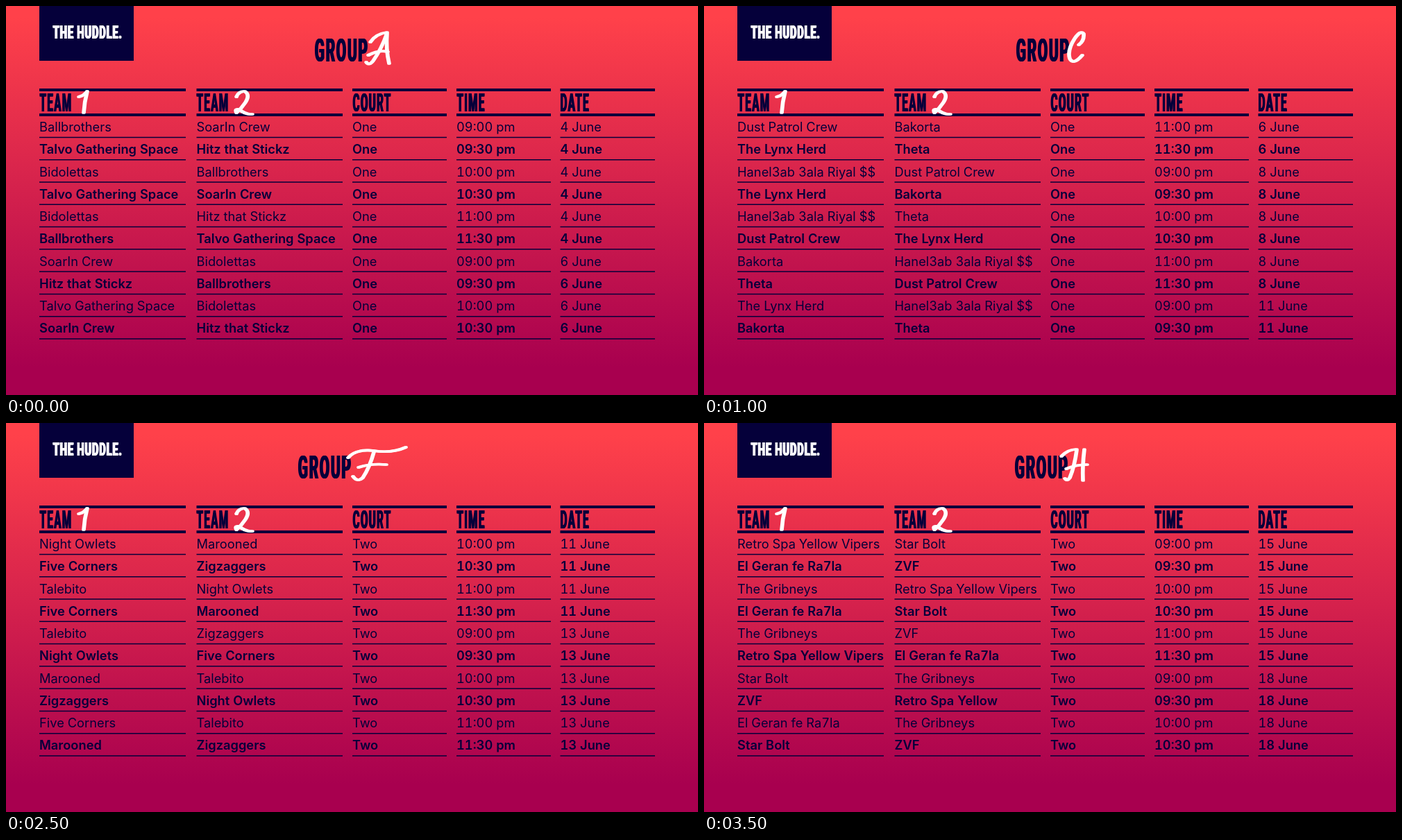
Animation, 997 px wide and 561 px high, one loop 4000 ms. Source, as an HTML page:

```html
<!DOCTYPE html>
<html lang="en">
<head>
<meta charset="utf-8">
<title>Group fixtures</title>
<style>
  html, body { margin: 0; width: 100%; height: 100%; overflow: hidden; }
  #stage {
    position: relative; width: 997px; height: 561px; overflow: hidden;
    background: linear-gradient(#ff414a 3%, #a8004f 93%);
    color: #05003a; font: 400 18.3px/22px Inter, sans-serif;
    font-variant-numeric: tabular-nums;
  }
  #stage div, #stage span, svg { position: absolute; }
  svg { left: 0; top: 0; fill: none; }
  .brush { stroke: #fff; stroke-width: 3.7; stroke-linecap: round; stroke-linejoin: round; }
  .rules { stroke: #05003a; }
  span { white-space: pre; transform: translateY(-50%); }
  .bold { font-weight: 600; }
  #stage .caps {
    font: 700 36.5px/1 Roboto, sans-serif; letter-spacing: .1em;
    text-shadow: .045em 0, .09em 0;
    transform-origin: 0 50%; transform: translateY(-50%) scaleX(.41);
  }
  #stage .title { font-size: 46.4px; transform: translateY(-50%) scaleX(.44); }
  #badge { left: 48px; top: 0; width: 136px; height: 79px; background: #05003a; color: #fff; }
  #stage .brand {
    font-size: 25.5px; font-weight: 900; letter-spacing: .05em; text-shadow: .04em 0, .08em 0;
    transform: translateY(-50%) scaleX(.58);
  }
  .panel { inset: 0; visibility: hidden; }
</style>
</head>
<body>
<div id="stage">
  <div id="badge"><span class="caps brand" style="left:19px;top:38.5px">THE HUDDLE.</span></div>
</div>
<script>
const STEP = 500;
const ROW = 32.27;
const COLUMNS = [
  { name: 'TEAM', x: 48, w: 211 },
  { name: 'TEAM', x: 274.5, w: 210.5 },
  { name: 'COURT', x: 499, w: 136 },
  { name: 'TIME', x: 649, w: 136 },
  { name: 'DATE', x: 798.5, w: 136.5 }
];
const DAYS = [4, 6, 8, 11, 13, 15, 18];
const SLOTS = ['09:00', '09:30', '10:00', '10:30', '11:00', '11:30'];

// Round robin of five teams
const PAIRS = ['01', '23', '40', '21', '43', '02', '14', '30', '24', '13'];

// Title position, brush letter and teams of each group
const GROUPS = [
  { x: 444, letter: 'M525 52Q533 40 549 38M549 39Q541 62 529 79Q523 87 519 81M549 39Q547 62 552 83M522 71Q537 63 550 66',
    teams: ['Ballbrothers', 'SoarIn Crew', 'Talvo Gathering Space', 'Hitz that Stickz', 'Bidolettas'] },
  { x: 446, letter: 'M537 43Q532 62 526 80M518 51Q530 36 545 40Q553 48 534 58Q553 60 547 72Q539 84 524 80',
    teams: ['Sandstormers', 'Quick Feet', 'Noon Street Club', 'Red Lanterns', 'Bovarinos'] },
  { x: 449, letter: 'M540 56Q548 50 547 40Q543 34 534 47Q523 64 527 76Q532 86 545 71',
    teams: ['Dust Patrol Crew', 'Bakorta', 'The Lynx Herd', 'Theta', 'Hanel3ab 3ala Riyal $$'] },
  { x: 444, letter: 'M532 47Q529 62 522 78M515 49Q524 37 540 38Q555 43 550 59Q543 80 527 81Q521 80 523 74',
    teams: ['Ocelots', 'Kestrels Italian Football', 'Fer2a Crew', 'Piston Bash', 'Civets'] },
  { x: 446, letter: 'M546 35Q546 42 536 43Q528 46 531 54Q535 58 543 56Q530 57 527 68Q525 82 534 81Q545 78 547 66Q548 60 544 66Q541 76 549 75',
    teams: ['Brioza', 'Patineur', 'ElSakarolians', 'Brisk', 'Convertiva'] },
  { x: 420, letter: 'M493 50Q504 37 530 40Q556 44 576 35M530 42Q524 64 514 79Q506 86 500 77M508 64Q526 58 548 60',
    teams: ['Night Owlets', 'Marooned', 'Five Corners', 'Zigzaggers', 'Talebito'] },
  { x: 443, letter: 'M551 41Q545 37 536 51Q526 68 531 73Q537 75 546 62M517 73Q530 66 552 60M546 60Q545 82 550 96',
    teams: ['Bolaneeka', 'Solid Points', 'Victors', 'Fencers', 'River Joggers'] },
  { x: 447, letter: 'M515 48Q524 38 537 38M537 39Q534 62 527 79Q523 85 520 80M548 38Q545 62 546 83M522 66Q536 60 552 60',
    teams: ['Retro Spa Yellow Vipers', 'Star Bolt', 'El Geran fe Ra7la', 'ZVF', 'The Gribneys'] }
];

const stage = document.getElementById('stage');

function label(parent, text, x, y, cls = '') {
  const el = document.createElement('span');
  el.textContent = text;
  el.className = cls;
  el.style.left = x + 'px';
  el.style.top = y + 'px';
  parent.append(el);
}

function drawing(parent, cls, content) {
  parent.insertAdjacentHTML('beforeend', `<svg class="${cls}" width="997" height="561">${content}</svg>`);
}

// Two shifted strokes make a broad nib
function brush(parent, d) {
  drawing(parent, 'brush', [-1, 1].map(dx => `<path d="${d}" transform="translate(${dx})"/>`).join(''));
}

const rule = (y, width) =>
  `<path stroke-width="${width}" d="${COLUMNS.map(({ x, w }) => `M${x} ${y}h${w}`).join('')}"/>`;

drawing(stage, 'rules', rule(121, 4) + rule(157, 4) +
  PAIRS.map((_, i) => rule(189.5 + i * ROW, 1.5)).join(''));
for (const { name, x } of COLUMNS) label(stage, name, x - 0.5, 139.6, 'caps');
brush(stage, 'M105 131Q113 129 117 123Q113 138 112 154');
brush(stage, 'M332 131Q335 123 344 123Q352 128 345 139Q339 148 332 154Q329 148 336 149Q345 157 355 156');

const panels = GROUPS.map(({ x, letter, teams }, g) => {
  const panel = document.createElement('div');
  panel.className = 'panel';
  label(panel, 'GROUP', x - 0.5, 64, 'caps title');
  brush(panel, letter);
  PAIRS.forEach((pair, i) => {
    const slot = (g >> 1) * 10 + i;
    let away = teams[pair[1]];
    // The longest name is shortened in this one cell
    if (g === 7 && i === 7) away = away.replace(' Vipers', '');
    const cells = [
      teams[pair[0]], away, g % 2 ? 'Two' : 'One',
      SLOTS[slot % 6] + ' pm', DAYS[Math.floor(slot / 6)] + ' June'
    ];
    const y = Math.round(174 + i * ROW);
    cells.forEach((text, c) => label(panel, text, COLUMNS[c].x, y, i % 2 ? 'bold' : ''));
  });
  stage.append(panel);
  return panel;
});

let start = null;
function draw(now) {
  start ??= now;
  const current = Math.floor((now - start) / STEP) % panels.length;
  panels.forEach((panel, i) => { panel.style.visibility = i === current ? 'visible' : 'hidden'; });
  requestAnimationFrame(draw);
}
panels[0].style.visibility = 'visible';
requestAnimationFrame(draw);
</script>
</body>
</html>
```
